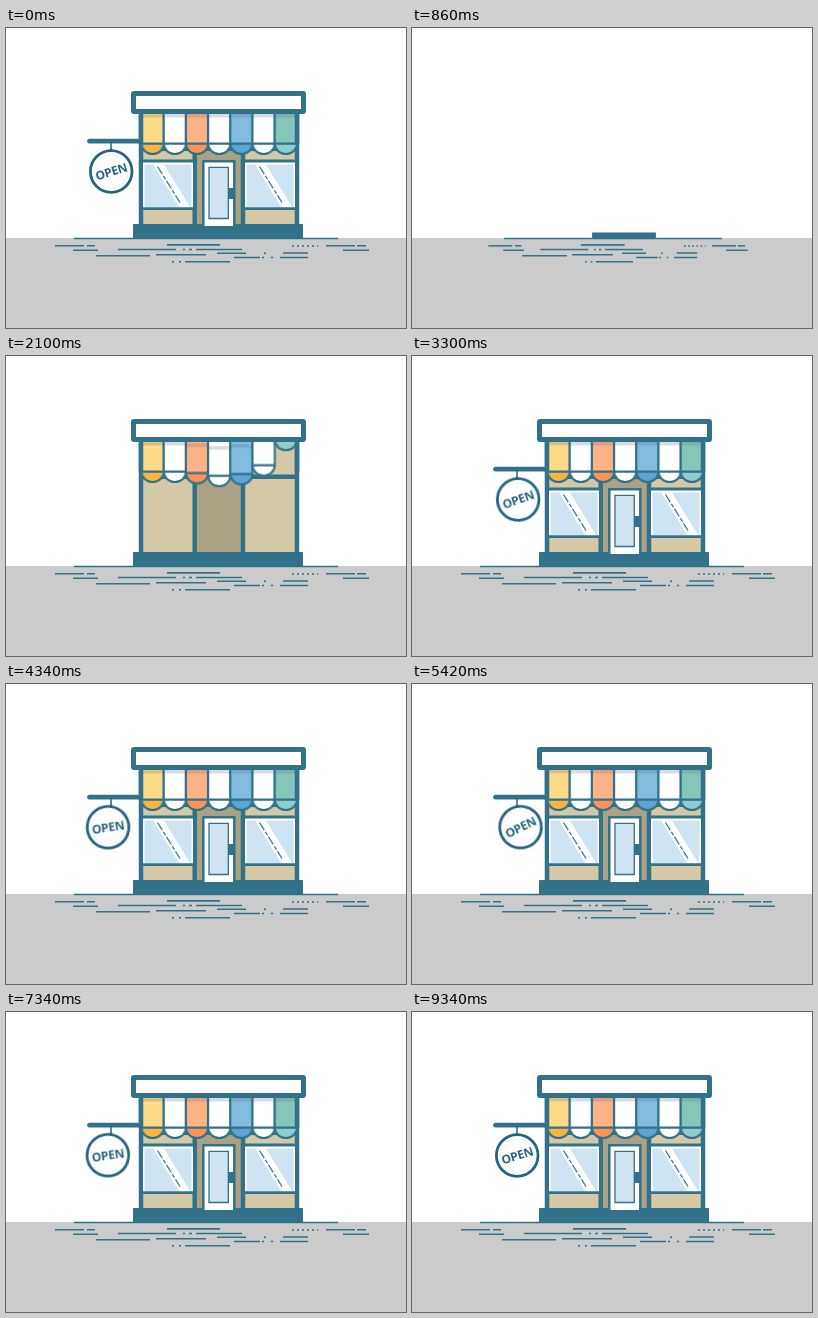
Animation of 400 by 300 pixels, one loop 9.38 s. Source, as an HTML page without scripts:

```html
<!DOCTYPE html>
<html lang="en">
<head>
<meta charset="utf-8">
<title>Shop opening</title>
<style>
  html, body { margin: 0; width: 100%; height: 100%; overflow: hidden; background: #fff; }
  svg { display: block; width: 400px; height: 300px; --ink: #31728a; }
  .ink { fill: var(--ink); }
  .line { fill: none; stroke: var(--ink); }
  .anim { animation: 9380ms linear infinite; }

  /* every part resets while the scene is hidden */
  .scene { animation-name: scene; animation-timing-function: step-end; }
  @keyframes scene { 0% { opacity: 1 } 5.33% { opacity: 0 } 7.88%, 100% { opacity: 1 } }

  .ground { animation-name: ground; transform-origin: 206px 210px; animation-timing-function: ease-out; }
  @keyframes ground {
    0%, 5.4% { transform: none }
    5.5%, 7.6% { transform: scaleX(0) }
    10.4% { transform: scaleX(1.1) }
    12%, 100% { transform: none }
  }

  .base { animation-name: base; transform-origin: 212px 210px; }
  @keyframes base {
    0%, 5.4% { transform: none }
    5.5%, 8.5% { transform: scale(0) }
    10.4% { transform: scale(1.05, 1.1) }
    11.5%, 100% { transform: none }
  }

  .wall { animation-name: wall; transform-origin: 212px 198px; }
  @keyframes wall {
    0%, 5.4% { transform: none }
    5.5%, 9.5% { transform: scaleY(0) }
    12.2% { transform: scaleY(1.06) }
    13.3%, 100% { transform: none }
  }

  .roof { animation-name: roof; transform-origin: 212.5px 74.5px; }
  @keyframes roof {
    0%, 5.4% { transform: none }
    5.5%, 12.2% { transform: translateY(-26px) rotate(0deg) scale(0) }
    13% { transform: translateY(-20px) rotate(3deg) scale(.9, .5) }
    13.86% { transform: translateY(-9px) rotate(3deg) scale(1, .72) }
    14.9% { transform: translateY(1px) rotate(-1deg) scale(1, .95) }
    16%, 100% { transform: none }
  }
  .shade { animation-name: shade; }
  @keyframes shade { 0%, 12% { opacity: 0 } 12.1%, 14% { opacity: 1 } 15.5%, 100% { opacity: 0 } }

  .awning { animation-name: awning; animation-timing-function: step-end; }
  @keyframes awning { 0% { opacity: 1 } 5.33% { opacity: 0 } 16.84%, 100% { opacity: 1 } }
  .strip { animation-name: drop; animation-delay: calc(1580ms + var(--k) * 80ms - 9380ms); }
  @keyframes drop {
    0% { transform: translateY(-45px) }
    1.28% { transform: translateY(-6.5px) }
    2.4% { transform: translateY(5px) }
    3.1% { transform: translateY(4px) }
    4.26%, 89.5% { transform: none }
    90%, 100% { transform: translateY(-45px) }
  }

  .pane { animation-name: pane; transform-origin: 161.5px 157px; animation-delay: calc(var(--wait) - 9380ms); }
  @keyframes pane {
    0%, 5.4% { transform: none }
    5.5%, 24.5% { transform: scale(0) }
    27% { transform: scale(1.07) }
    28.5%, 100% { transform: none }
  }

  .door { animation-name: door; transform-origin: 213px 198px; }
  @keyframes door {
    0%, 5.4% { transform: none }
    5.5%, 25.5% { transform: scaleY(0) }
    28% { transform: scaleY(1.06) }
    29.4%, 100% { transform: none }
  }

  .pole { animation-name: pole; transform-origin: 134px 113px; }
  @keyframes pole {
    0%, 5.4% { transform: none }
    5.5%, 27.5% { transform: scaleX(0) }
    29.8% { transform: scaleX(1.04) }
    30.8%, 100% { transform: none }
  }

  .sign { --ink: #27657e; animation-name: sign; transform-origin: 105px 115px; }
  @keyframes sign {
    0%, 5.4% { transform: none }
    5.5%, 30.2% { transform: scale(0) }
    32.6% { transform: scale(1.08) }
    34%, 100% { transform: none }
  }
  /* pendulum: one full swing every 8.18% */
  .swing { animation-name: swing; transform-origin: 105px 122px; animation-timing-function: cubic-bezier(.37, 0, .63, 1); }
  @keyframes swing {
    0%, 30.2%, 92.5%, 100% { transform: rotate(0deg) }
    33.5%, 41.7%, 49.9%, 58.1%, 66.2%, 74.4%, 82.6% { transform: rotate(-9.3deg) }
    37.6%, 45.8%, 54%, 62.1%, 70.3%, 78.5%, 86.7% { transform: rotate(9deg) }
  }
  .label { font: 700 12px "Open Sans", "Noto Sans", sans-serif; letter-spacing: -.25px; text-anchor: middle; }
</style>
</head>
<body>
<svg viewBox="0 0 400 300">
  <defs>
    <clipPath id="under"><path d="M120 84H310V150H120Z"/></clipPath>
    <g id="strip">
      <path d="M0 30V115.5A11.15 10.5 0 0 0 22.3 115.5V30Z" fill="var(--c)"/>
      <path d="M0 115.5A11.15 10.5 0 0 0 22.3 115.5Z" fill="var(--d)"/>
      <path d="M0 86H22.3V89.5H0Z" fill="#46506e" opacity=".2"/>
      <path class="line" d="M0 30V115.5A11.15 10.5 0 0 0 22.3 115.5V30M0 115.6H22.3" stroke-width="2.1"/>
    </g>
    <g id="pane">
      <path d="M137 133H187V181H137Z" fill="#fff"/>
      <path d="M138.5 136.5H185.5V179H138.5Z" fill="#cfe4f2"/>
      <path d="M147 136.5H158L184 179H173Z" fill="#fff"/>
      <path class="line" d="M151.5 138.500L174 174.500" stroke-width="1.200" stroke-dasharray="9 2 4 2"/>
      <path class="line" d="M136 133H188M136 180.700H188" stroke-width="2.800"/>
    </g>
  </defs>

  <path d="M0 210H400V300H0Z" fill="#cbcbcb"/>

  <g class="anim scene">
    <g class="anim ground line" stroke-width="1.600">
      <path d="M68 210.500H332M49 217.800H78M81 217.800H89M161 216.900H214M320 217.800H349M351 217.800H360
        M67 222.300H92M337 222.300H363M112 221.500H170M177 221.500h2M183 221.500h3M190 221.500H236
        M90 227.700H144M150 226.700H200M211 225.300H240M258 225.300h2M277 225H302
        M228 229.500H254M256 229.500h2M265 229.500h2M274 229.500H302
        M166 233.700h2M173 233.700h2M179 233.700H224"/>
      <path d="M286 218H312" stroke-dasharray="2 3"/>
    </g>

    <g class="anim wall">
      <path d="M135 85.500H291V198H135Z" fill="#d5c8a7"/>
      <path d="M189 121H237V198H189Z" fill="#aba185"/>
      <path class="line" d="M135 198V85.500H291V198M135 120.800H291M188.700 121V198M237 121V198" stroke-width="4.500"/>
    </g>
    <rect class="anim base ink" x="127" y="196" width="170" height="15" rx="1"/>

    <use href="#pane" class="anim pane" style="--wait:0ms"/>
    <g transform="translate(102)"><use href="#pane" class="anim pane" style="--wait:150ms"/></g>

    <g class="anim door">
      <path d="M197.300 198V133.300H228.300V198" fill="#fff" stroke="var(--ink)" stroke-width="2.500"/>
      <path d="M203 139.300H222.300V190.500H203Z" fill="#cfe4f2" stroke="var(--ink)" stroke-width="1.300"/>
      <rect class="ink" x="222" y="160" width="7" height="11" rx="1"/>
    </g>

    <g class="anim awning" clip-path="url(#under)">
      <g transform="translate(135.500)"><use href="#strip" class="anim strip" style="--k:0;--c:#ffdb88;--d:#f8b443"/></g>
      <g transform="translate(157.700)"><use href="#strip" class="anim strip" style="--k:1;--c:#fff;--d:#fff"/></g>
      <g transform="translate(179.900)"><use href="#strip" class="anim strip" style="--k:2;--c:#ffb286;--d:#fb9358"/></g>
      <g transform="translate(202.100)"><use href="#strip" class="anim strip" style="--k:3;--c:#fff;--d:#fff"/></g>
      <g transform="translate(224.300)"><use href="#strip" class="anim strip" style="--k:4;--c:#82bde0;--d:#5ea3d1"/></g>
      <g transform="translate(246.500)"><use href="#strip" class="anim strip" style="--k:5;--c:#fff;--d:#fff"/></g>
      <g transform="translate(268.700)"><use href="#strip" class="anim strip" style="--k:6;--c:#86c5b9;--d:#8fcbd0"/></g>
      <path class="line" d="M135 84V116M291 84V116" stroke-width="4.500"/>
    </g>

    <g class="anim roof">
      <rect x="127.500" y="65.500" width="170" height="18" rx=".5" fill="#fff" stroke="var(--ink)" stroke-width="5"/>
      <path class="anim shade" d="M130 77H295V81H130Z" fill="#c9d0d4"/>
    </g>

    <path class="anim pole line" d="M83.500 113.200H134" stroke-width="4.800" stroke-linecap="round"/>
    <g class="anim sign">
      <path class="line" d="M105 114V122" stroke-width="1.500"/>
      <g class="anim swing">
        <path class="line" d="M101 125L105 121L109 125" stroke-width="1.200"/>
        <circle cx="105.200" cy="143.500" r="20.800" fill="#fff" stroke="var(--ink)" stroke-width="2.800"/>
        <circle cx="105.200" cy="143.500" r="16.500" fill="none" stroke="#c5d3d9" stroke-width=".8" stroke-dasharray="1 2"/>
        <text class="label ink" transform="translate(105.200 143.500) rotate(-17)" y="4.300">OPEN</text>
      </g>
    </g>
  </g>
</svg>
</body>
</html>
```
